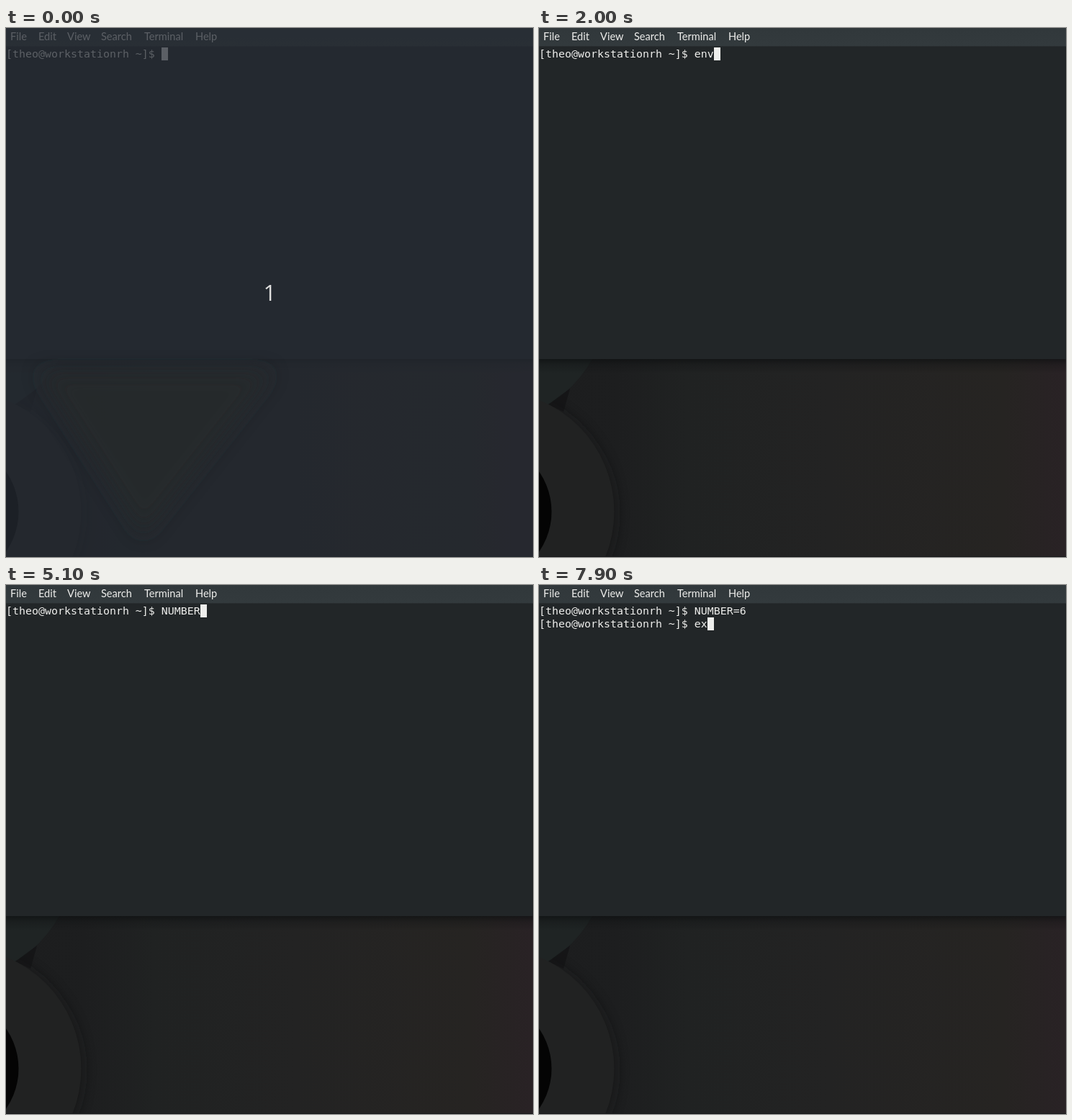
These frames come from a looping animation (732x735 px, 8000 ms). An HTML page:

```html
<!DOCTYPE html>
<html lang="en">
<head>
<meta charset="utf-8">
<title>Terminal session</title>
<style>
  html, body { margin: 0; width: 100%; height: 100%; overflow: hidden; background: #222628; }
  svg { display: block; width: 732px; height: 735px; }
  text { fill: #eeeeec; white-space: pre; }
  .menu { font: 14.6px Lato, "Open Sans", sans-serif; }
  .shell { font: 14.95px "DejaVu Sans Mono", monospace; }
  .count { font: 31px "Open Sans", sans-serif; fill: #dededd; }
</style>
</head>
<body>
<svg viewBox="0 0 732 735">
  <defs>
    <linearGradient id="desk">
      <stop offset="0" stop-color="#1c1d1e"/>
      <stop offset=".15" stop-color="#1d1e1f"/>
      <stop offset=".28" stop-color="#202222"/>
      <stop offset=".55" stop-color="#232323"/>
      <stop offset=".88" stop-color="#262422"/>
      <stop offset="1" stop-color="#292225"/>
    </linearGradient>
    <linearGradient id="bar" x2="0" y2="1">
      <stop offset="0" stop-color="#31383b"/>
      <stop offset="1" stop-color="#333a3d"/>
    </linearGradient>
    <linearGradient id="shade" x2="0" y2="1">
      <stop offset="0" stop-color="#0c0e0f" stop-opacity=".65"/>
      <stop offset=".4" stop-color="#0c0e0f" stop-opacity=".25"/>
      <stop offset="1" stop-color="#0c0e0f" stop-opacity="0"/>
    </linearGradient>
    <filter id="soft" x="-30%" y="-30%" width="160%" height="160%"><feGaussianBlur stdDeviation="9"/></filter>
    <filter id="haze" x="-30%" y="-30%" width="160%" height="160%"><feGaussianBlur stdDeviation="14"/></filter>
  </defs>

  <!-- desktop -->
  <rect y="460" width="732" height="275" fill="url(#desk)"/>
  <circle cx="-61" cy="674" r="168" fill="#141516" opacity=".6" filter="url(#soft)"/>
  <circle cx="-72.6" cy="379" r="167.5" fill="#1f2424"/>
  <path d="M13 523L43 501L34 533Z" fill="#131314" opacity=".7"/>
  <circle cx="-63" cy="672" r="167.5" fill="#212222"/>
  <circle cx="-80" cy="672" r="97.5" fill="#040404"/>
  <rect y="460" width="732" height="20" fill="url(#shade)"/>
  <rect y="734" width="732" height="1" fill="#17191a"/>

  <!-- window -->
  <rect width="732" height="460" fill="#222628"/>
  <rect width="732" height="25" fill="url(#bar)"/>
  <rect y="25" width="732" height="1" fill="#282d2f"/>
  <rect x="731" y="26" width="1" height="434" fill="#1b1f20"/>
  <g id="menu" class="menu"></g>
  <text id="row0" class="shell" x="0" y="41"></text>
  <text id="row1" class="shell" x="0" y="59"></text>
  <rect id="cursor" width="9" height="18" fill="#eeeeec"/>

  <g id="countdown">
    <rect width="732" height="735" fill="#262b33" opacity=".73"/>
    <path d="M45 478H370L190 705Z" fill="#262b2c" opacity=".7" filter="url(#haze)"/>
    <text class="count" x="357.5" y="379">1</text>
  </g>
</svg>
<script>
  const LOOP = 8000, COUNT_END = 300;
  const CELL = 9, ROW = 18, TOP = 27;
  const PROMPT = "[theo@workstationrh ~]$ ";
  const FIRST = "NUMBER=6", ENTER = 6700;

  // start time, typed text, cursor visible
  const steps = [
    [0, "", true], [300, "", false], [900, "", true],
    [1600, "clear", true], [2000, "env", true], [2400, "env", false],
    [2900, "en", true], [3100, "e", true], [3200, "", true],
    [3700, "", false], [4300, "", true],
    [4400, "N", true], [4600, "NU", true], [4900, "NUM", true],
    [5000, "NUMB", true], [5100, "NUMBER", true], [5700, "NUMBER", false],
    [5800, "NUMBER=", true], [6300, "NUMBER=", false], [6600, FIRST, true],
    [ENTER, "", true], [7200, "", false], [7600, "", true],
    [7700, "e", true], [7900, "ex", true]
  ];

  const get = id => document.getElementById(id);
  const rows = [get("row0"), get("row1")];
  const cursor = get("cursor"), countdown = get("countdown");

  const menu = { File: 7, Edit: 46, View: 86, Search: 133, Terminal: 193, Help: 264 };
  for (const [label, x] of Object.entries(menu)) {
    const item = document.createElementNS("http://www.w3.org/2000/svg", "text");
    item.setAttribute("x", x - 1);
    item.setAttribute("y", 17);
    item.textContent = label;
    get("menu").append(item);
  }

  const show = (el, on) => el.setAttribute("visibility", on ? "visible" : "hidden");

  function draw(t) {
    const [, typed, lit] = steps.findLast(step => step[0] <= t);
    const line = t >= ENTER ? 1 : 0;
    rows[0].textContent = PROMPT + (line ? FIRST : typed);
    rows[1].textContent = line ? PROMPT + typed : "";
    cursor.setAttribute("x", (PROMPT.length + typed.length) * CELL);
    cursor.setAttribute("y", TOP + line * ROW);
    show(cursor, lit);
    show(countdown, t < COUNT_END);
  }

  const start = performance.now();
  function tick() {
    draw((performance.now() - start) % LOOP);
    requestAnimationFrame(tick);
  }
  tick();
</script>
</body>
</html>
```
